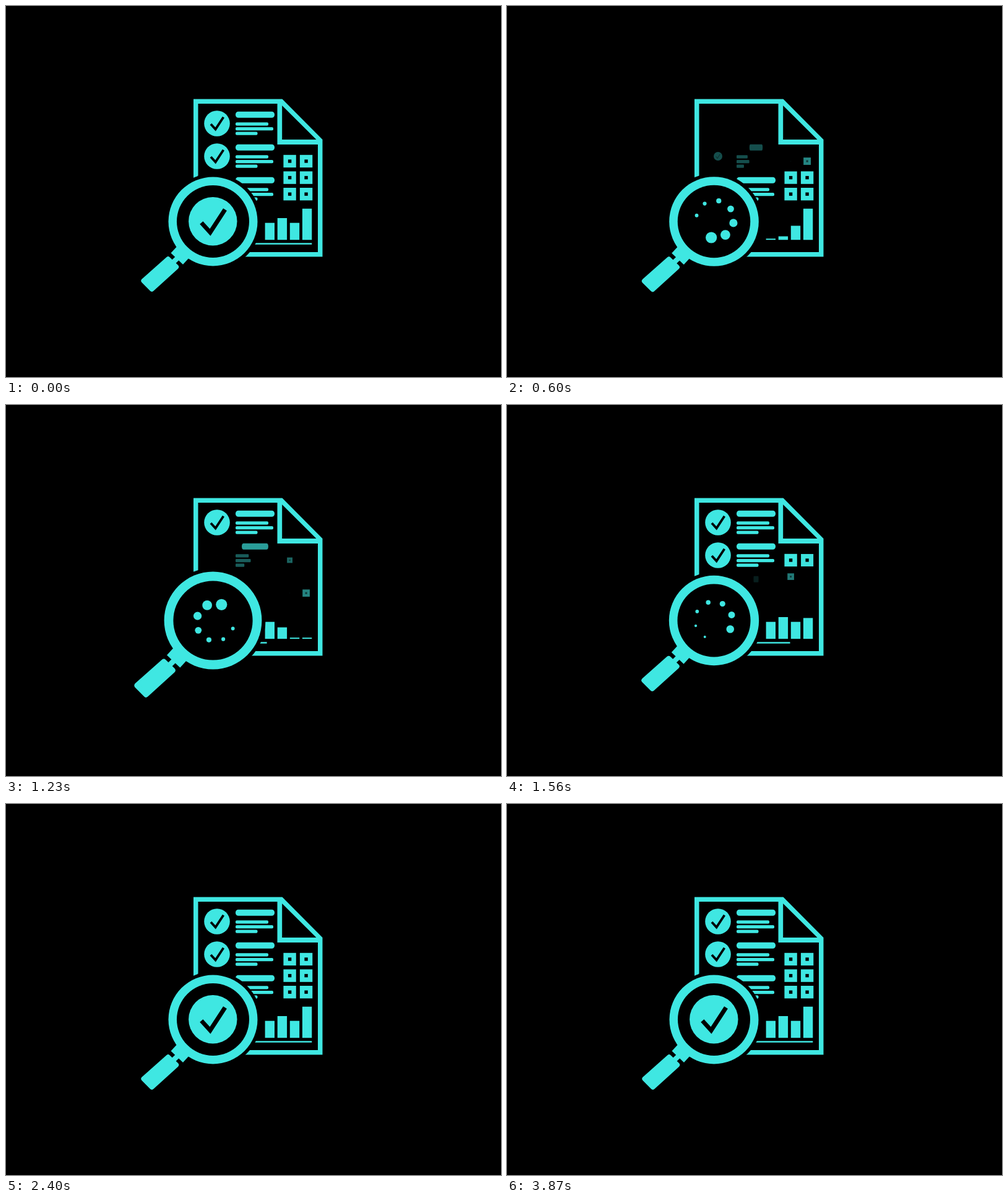
An HTML page with a canvas for the animation above (3900 ms loop, 800 by 600 pixels).

```html
<!DOCTYPE html>
<html lang="en">
<head>
<meta charset="utf-8">
<title>Document review</title>
<style>
  html, body { margin: 0; width: 100%; height: 100%; overflow: hidden; background: #000; }
  canvas { display: block; width: 800px; height: 600px; }
</style>
</head>
<body>
<canvas id="stage" width="800" height="600"></canvas>
<script>
const ctx = document.getElementById('stage').getContext('2d');
const LOOP = 3900, STEP = 30;
const TEAL = '#3fe7e2', BLACK = '#000';
const LENS = { x: 334.5, y: 348.5 };
const RAD = Math.PI / 180;

const progress = (t, start, duration) => Math.min(1, Math.max(0, (t - start) / duration));
const smooth = (t, start, duration) => (1 - Math.cos(Math.PI * progress(t, start, duration))) / 2;
const easeOut = (t, start, duration) => 1 - (1 - progress(t, start, duration)) ** 2;

function polygon(color, ...points) {
  ctx.fillStyle = color;
  ctx.beginPath();
  points.forEach(([x, y]) => ctx.lineTo(x, y));
  ctx.closePath();
  ctx.fill();
}

function disc(x, y, r, color = TEAL) {
  ctx.fillStyle = color;
  ctx.beginPath();
  ctx.arc(x, y, r, 0, 7);
  ctx.fill();
}

function rect(x, y, w, h, color = TEAL, radius = 0) {
  ctx.fillStyle = color;
  ctx.beginPath();
  ctx.roundRect(x, y, w, h, radius);
  ctx.fill();
}

// Draws around a local origin with its own scale, turn and opacity.
function placed(x, y, { sx = 1, sy = sx, turn = 0, alpha = 1 }, draw) {
  if (sx < 0.01 || alpha < 0.01) return;
  ctx.save();
  ctx.translate(x, y);
  ctx.rotate(turn * RAD);
  ctx.scale(sx, sy);
  ctx.globalAlpha = alpha;
  draw();
  ctx.restore();
}

function tick() {
  ctx.strokeStyle = BLACK;
  ctx.lineWidth = 7;
  ctx.beginPath();
  ctx.moveTo(-18.7, 2);
  ctx.lineTo(-4.5, 17.5);
  ctx.lineTo(19.5, -19.3);
  ctx.stroke();
}

function page() {
  polygon(TEAL, [303, 150.5], [446.5, 150.5], [511.5, 216], [511.5, 405.5], [303, 405.5]);
  polygon(BLACK, [310.5, 158], [438.5, 158], [438.5, 224], [504, 224], [504, 398], [310.5, 398]);
  polygon(BLACK, [446.2, 161], [446.2, 216], [501.5, 216]);
}

function textRow(t, i) {
  const y = 190 + i * 53;
  const gone = smooth(t, 68 + i * 302, 380);
  const shown = start => Math.max(1 - gone, easeOut(t, start + i * 440, 300));
  const header = shown(660), lines = shown(722), badge = shown(786);

  placed(402.5, y, { sx: header, sy: 1, alpha: header }, () =>
    rect(-31.5, -19.2, 63, 10, TEAL, 4.5));
  placed(371, y, { sx: lines, sy: 1, alpha: lines }, () =>
    [53, 61, 35.5].forEach((w, k) => rect(0, -1.7 + k * 7.6, w, 5.3, TEAL, 2)));
  const turn = t > 500 + i * 302 ? 80 * (1 - badge) : 0;
  placed(341, y, { sx: badge, turn, alpha: badge }, () => {
    disc(0, 0, 20.8);
    ctx.scale(0.535, 0.535);
    tick();
  });
}

function cell(t, i) {
  const s = 1 - smooth(t, 264 + i * 157, 400) + smooth(t, 1056 + i * 154, 380);
  const x = 458.6 + (i % 2) * 26.5, y = 251 + Math.floor(i / 2) * 26.6;
  placed(x, y, { sx: s, alpha: s }, () => {
    rect(-10.2, -10.2, 20.4, 20.4);
    rect(-2.7, -2.7, 5.4, 5.4, BLACK);
  });
}

function chart(t) {
  [27.5, 35.2, 27.5, 50.5].forEach((full, i) => {
    const s = 1 - smooth(t, 215 + i * 150, 300) + smooth(t, 930 + i * 150, 300);
    const h = 2 + (full - 2) * s;
    rect(418.6 + i * 20.1, 378.2 - h, 15.4, h);
  });
  const base = 1 - smooth(t, 0, 300) + smooth(t, 562, 1620);
  rect(380, 383.2, 114.3 * base, 2.5);
}

function magnifier(t) {
  const s = 1 + 0.102 * (smooth(t, 535, 490) - smooth(t, 1150, 510));
  placed(LENS.x, LENS.y, { sx: s }, () => {
    disc(0, 0, 77.5, BLACK);
    ctx.translate(-LENS.x, -LENS.y);

    polygon(TEAL, [278, 387], [297, 406], [286, 418], [266.5, 399.5]);
    ctx.strokeStyle = TEAL;
    ctx.lineWidth = 8;
    ctx.beginPath();
    ctx.moveTo(281, 404);
    ctx.lineTo(267, 417.5);
    ctx.stroke();

    ctx.lineJoin = 'round';
    polygon(TEAL, [262, 409.3], [275.2, 422], [235.8, 457.8], [222.4, 444.4]);
    ctx.stroke();

    disc(LENS.x, LENS.y, 72);
    disc(LENS.x, LENS.y, 58.5, BLACK);
  });
}

function spinner(t) {
  const size = smooth(t, 100, 180) - smooth(t, 1500, 160);
  if (size < 0.01) return;
  const head = 12 + 0.2985 * (t - 300);
  // The ring of dots turns around a point slightly off its own centre.
  const cx = 337.4 + 3.4 * Math.cos((head + 148) * RAD);
  const cy = 348 + 3.4 * Math.sin((head + 148) * RAD);
  [9.1, 7.9, 6.6, 5.4, 4.1, 3.1, 2.9].forEach((r, i) => {
    const a = (head - 45 * i) * RAD;
    disc(cx + 30.3 * Math.cos(a), cy + 30.3 * Math.sin(a), r * size);
  });
}

function lensBadge(t) {
  const leaving = 1 - smooth(t, 0, 200);
  const s = leaving + smooth(t, 1610, 220);
  placed(LENS.x - 0.2, LENS.y - 0.2, { sx: s }, () => disc(0, 0, 39.2));
  const mark = leaving + smooth(t, 1698, 320);
  const turn = t > 1000 ? -100 * (1 - mark) : 0;
  placed(LENS.x, LENS.y, { sx: mark, turn, alpha: mark }, tick);
}

function draw(t) {
  ctx.fillStyle = BLACK;
  ctx.fillRect(0, 0, 800, 600);
  page();
  for (let i = 0; i < 3; i++) textRow(t, i);
  for (let i = 0; i < 6; i++) cell(t, i);
  chart(t);
  magnifier(t);
  spinner(t);
  lensBadge(t);
}

const origin = performance.now();
function frame() {
  const t = (performance.now() - origin) % LOOP;
  draw(Math.floor(t / STEP) * STEP);
  requestAnimationFrame(frame);
}
frame();
</script>
</body>
</html>
```
